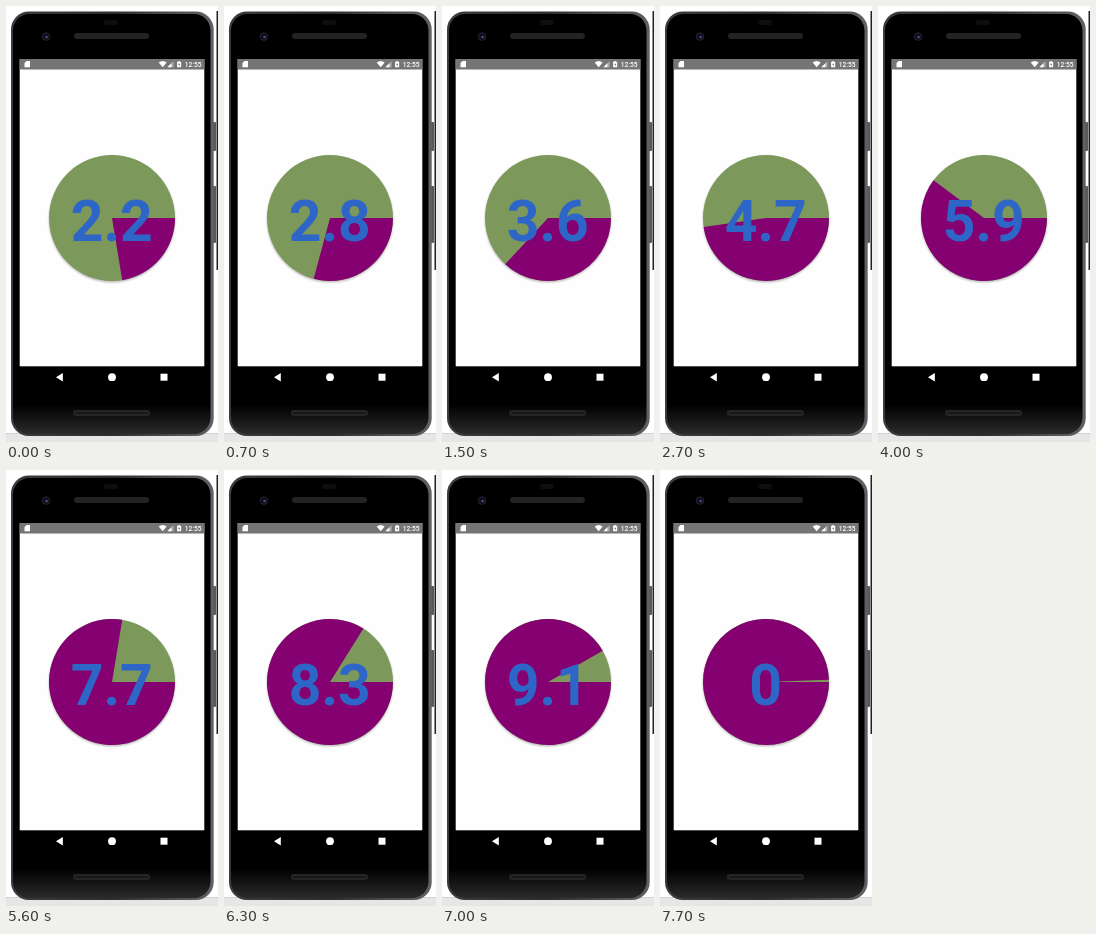
An HTML page that plays this animation: 212 by 436 pixels, repeating every 8000 ms.

```html
<!DOCTYPE html>
<html lang="en">
<head>
<meta charset="utf-8">
<title>Timer pie</title>
<style>
  html, body { margin: 0; width: 100%; height: 100%; overflow: hidden; background: #fff; }
  svg { display: block; width: 212px; height: 436px; }
  text { font-family: Roboto, Arial, sans-serif; }
  #count { font-size: 57px; font-weight: 700; fill: #2e66c8; text-anchor: middle; }
  #clock { font-size: 6.6px; font-weight: 500; fill: #fff; text-anchor: end; }
</style>
</head>
<body>
<svg viewBox="0 0 212 436">
  <defs>
    <linearGradient id="rim" x2="1" y2="0">
      <stop offset="0" stop-color="#3a3b3d"/>
      <stop offset=".5" stop-color="#2c2d2f"/>
      <stop offset="1" stop-color="#606163"/>
    </linearGradient>
    <linearGradient id="bezel" x2="0" y2="1">
      <stop offset=".93" stop-color="#000"/>
      <stop offset="1" stop-color="#2b2b2d"/>
    </linearGradient>
    <filter id="soft" x="-10%" y="-10%" width="120%" height="120%">
      <feGaussianBlur stdDeviation="1.1"/>
    </filter>
  </defs>

  <!-- Desktop around the phone -->
  <rect y="427" width="212" height="9" fill="#e6e6e6"/>
  <rect y="427" width="212" height="1" fill="#d2d2d2"/>
  <rect x="210.5" y="5" width="1.5" height="259" fill="#222224"/>

  <!-- Phone body -->
  <rect x="206" y="116" width="4" height="29" rx="1" fill="#58595c"/>
  <rect x="206" y="180" width="4" height="57" rx="1" fill="#58595c"/>
  <rect x="5" y="5.5" width="202.7" height="424.5" rx="18" fill="url(#rim)"/>
  <rect x="7" y="8" width="197.5" height="420" rx="16.5" fill="url(#bezel)"/>
  <rect x="98" y="14" width="14" height="5" rx="2.5" fill="#0e0e0f"/>
  <rect x="68" y="27" width="75" height="6" rx="3" fill="#232325"/>
  <rect x="67" y="404" width="77" height="6" rx="3" fill="#242527"/>
  <rect x="69" y="406" width="73" height="2" rx="1" fill="#19191a"/>
  <circle cx="40" cy="30.6" r="3.8" fill="#0d0d18" stroke="#25262e"/>
  <circle cx="40.6" cy="31" r="1.3" fill="#4a4a8c"/>

  <!-- Screen -->
  <rect x="13.7" y="53" width="184.6" height="307.3" fill="#fefefe"/>
  <rect x="13.7" y="53" width="184.6" height="10.5" fill="#757575"/>
  <g fill="#fff">
    <path d="M20.5 55H24V61.2H18.5V57Z"/>
    <path d="M152.7 56.5Q156.7 53.4 160.7 56.5L156.7 61.3Z"/>
    <path d="M167.6 55V61.2H161.4Z" opacity=".4"/>
    <path d="M165.4 57.2V61.2H161.4Z"/>
    <path d="M172.4 55H173.9V55.8H175.2V61.3H171.1V55.8H172.4Z"/>
    <path d="M56.8 367V375.4L50 371.2Z"/>
    <circle cx="106" cy="371.2" r="3.9"/>
    <rect x="154.5" y="367.7" width="7" height="7"/>
  </g>
  <path d="M173.5 56.7L172.2 59H173.2V60.5L174.3 58.3H173.3Z" fill="#757575"/>
  <text id="clock" x="195.4" y="60.6">12:55</text>

  <!-- Pie and counter -->
  <circle cx="106" cy="213.3" r="63" fill="#000" opacity=".3" filter="url(#soft)"/>
  <circle cx="106" cy="212" r="63" fill="#7c995b"/>
  <path id="slice" fill="#850070"/>
  <text id="count" x="105.7" y="234.7">2.2</text>
</svg>
<script>
  const LOOP = 8000, STEP = 100, END = 7700, FULL = 10;
  const LAG = 0.035; // the label trails the slice slightly
  const CX = 106, CY = 212, R = 63;
  // [time in ms, seconds counted]
  const keys = [
    [0, 2.24], [1500, 3.69], [2700, 4.775], [3600, 5.48], [4000, 6.02],
    [4900, 7.13], [6300, 8.39], [7200, 9.4], [END, 9.94]
  ];
  const slice = document.getElementById('slice');
  const count = document.getElementById('count');

  function secondsAt(t) {
    const i = keys.findIndex(k => k[0] > t);
    if (i < 0) return keys[keys.length - 1][1];
    const [t0, v0] = keys[i - 1], [t1, v1] = keys[i];
    return v0 + (v1 - v0) * (t - t0) / (t1 - t0);
  }

  function draw(t) {
    const secs = secondsAt(t);
    const a = secs / FULL * 2 * Math.PI;
    const x = CX + R * Math.cos(a), y = CY + R * Math.sin(a);
    const large = a > Math.PI ? 1 : 0;
    slice.setAttribute('d', `M${CX} ${CY}H${CX + R}A${R} ${R} 0 ${large} 1 ${x} ${y}Z`);
    count.textContent = t >= END ? '0' : (Math.floor((secs - LAG) * 10) / 10).toFixed(1);
  }

  const start = performance.now();
  function tick() {
    const t = (performance.now() - start) % LOOP;
    draw(Math.min(END, Math.floor(t / STEP) * STEP));
    requestAnimationFrame(tick);
  }
  tick();
</script>
</body>
</html>
```
